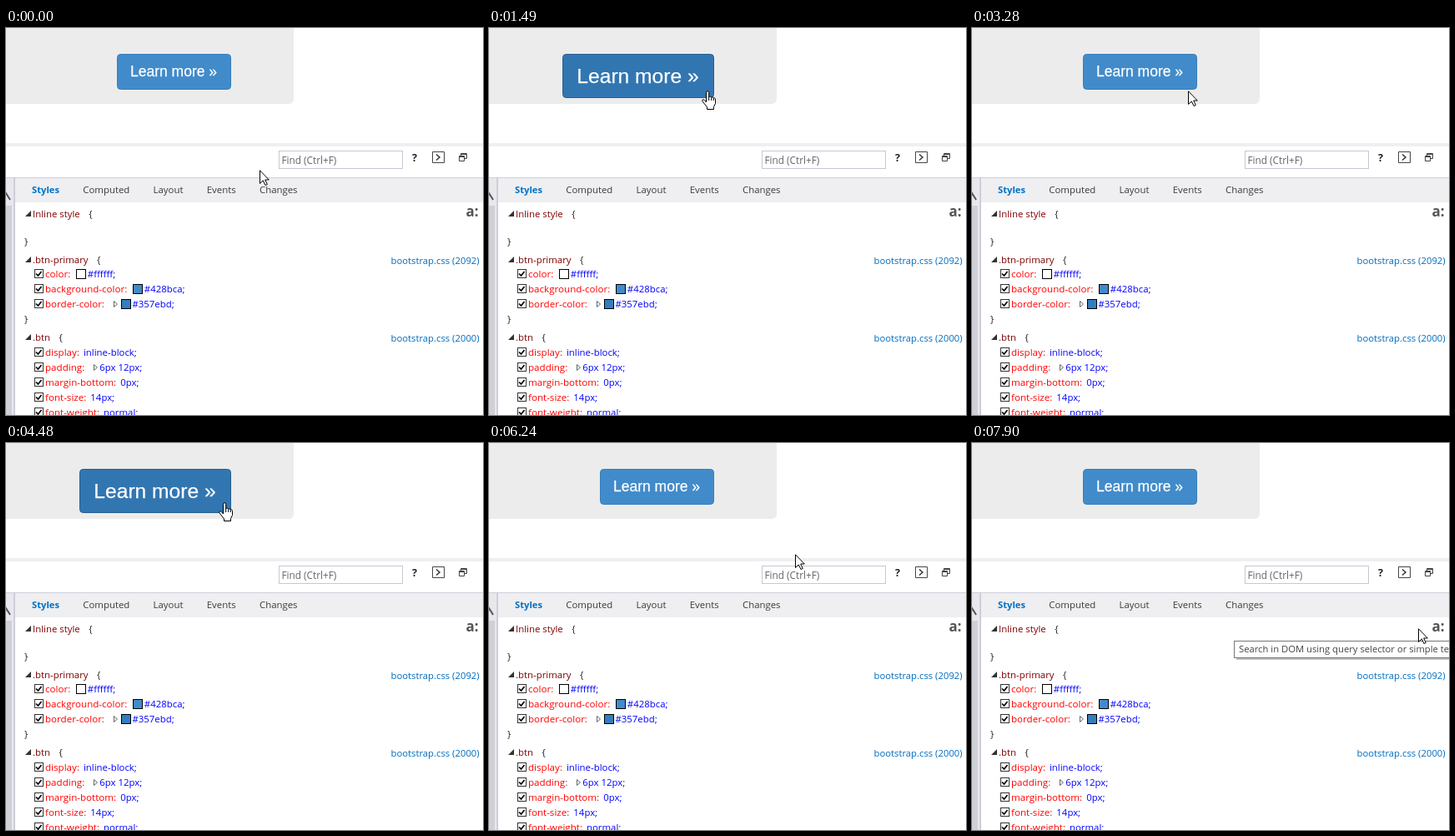
An HTML page for the animation above (8 s loop, 572 by 464 pixels).

```html
<!DOCTYPE html>
<html lang="en">
<head>
<meta charset="utf-8">
<title>Button hover with style inspector</title>
<style>
  html, body { margin: 0; width: 100%; height: 100%; overflow: hidden; background: #fff; }
  svg { display: block; width: 572px; height: 464px; }
  text { font: 11.4px "Open Sans", "Noto Sans", sans-serif; white-space: pre; }
  .button text { font-family: "Liberation Sans", Arial, sans-serif; fill: #fff; stroke: #fff; stroke-width: .25px; text-anchor: middle; }
  .tab { fill: #3c3c3c; }
  .tab.active { fill: #0072c6; font-weight: 700; font-size: 11.2px; }
  .selector { fill: #800000; }
  .brace { fill: #222; }
  .prop { fill: #f00; font-size: 11.6px; }
  .value { fill: #00f; }
  .link { fill: #006cbe; font-size: 11.3px; }
  .hint { fill: #666; font-size: 11.8px; }
  .tip { fill: #444; font-size: 11.25px; }
  .icon { font-weight: 700; }
</style>
</head>
<body>
<svg viewBox="0 0 572 464">
  <path fill="#ececec" d="M0 0H345V85a6 6 0 0 1-6 6H0Z"/>
  <g class="button" id="normal">
    <rect x="133.5" y="31.5" width="136" height="42" rx="4" fill="#428bca" stroke="#357ebd"/>
    <text x="201" y="58" style="font-size:17.5px">Learn more »</text>
  </g>
  <g class="button" id="hovered">
    <rect x="88.5" y="31.5" width="181" height="52" rx="4" fill="#3276b1" stroke="#285e8e"/>
    <text x="178.5" y="66" style="font-size:24.6px">Learn more »</text>
  </g>

  <path fill="#efeff2" d="M0 138H572V142H0ZM11 179H572V209H11Z"/>
  <path fill="#e8e8ec" d="M0 179H9V464H0Z"/>
  <path fill="#d0d1d7" d="M0 213H7V464H0Z"/>
  <path fill="#cccedb" d="M0 179H572V180H0ZM9 179H11V464H9Z"/>
  <path fill="none" stroke="#555" stroke-width="2" d="M-2 200L0 198 5 206"/>
  <rect id="field" x="327.5" y="147.5" width="148" height="21" fill="#fff"/>

  <text class="icon" x="487" y="160" style="font-size:12.5px" fill="#222">?</text>
  <path fill="none" stroke="#444" d="M511.5 148.5H525.5V161.5H511.5Z"/>
  <path fill="none" stroke="#333" stroke-width="1.5" d="M516 151.5L520 155 516 158.5"/>
  <path fill="none" stroke="#444" d="M545.5 153V150.5H552.5V156.5H550M543.5 153.5H549.5V159.5H543.5ZM543.5 154.5H549.5M545.5 151.5H552.5"/>
  <text class="icon" x="551.5" y="226" style="font-size:17px" fill="#555">a:</text>
  <g id="panel"></g>

  <g id="tooltip">
    <path fill="#000" opacity=".25" d="M317 257H572V260H317Z"/>
    <rect x="314.5" y="237.5" width="270" height="20" fill="#fff" stroke="#767676"/>
    <text class="tip" x="320" y="251">Search in DOM using query selector or simple text</text>
  </g>
  <g fill="#fff" stroke="#000">
    <path id="arrow" d="M.5 .8V16.5L4.3 12.9 7 18.5 9.3 17.5 6.7 12H11.3Z"/>
    <path id="hand" stroke-linejoin="round" d="M5.5 14V2.3a1.6 1.6 0 0 1 3.2 0V8a1.6 1.6 0 0 1 3 .4 1.5 1.5 0 0 1 2.6 .7 1.4 1.4 0 0 1 2.2 1.2V15.5L14.5 19.5V22.5H6.5V20L1 12.8c-1-1.5 .8-2.8 2-1.7ZM8.7 8V12M11.7 8.4V12M14.3 9.1V12"/>
  </g>
</svg>
<script>
const LOOP = 8000;
const FRAME = 125;
const LINE = 18;
const $ = id => document.getElementById(id);

function add(tag, attrs, content = '') {
  const el = document.createElementNS('http://www.w3.org/2000/svg', tag);
  for (const name in attrs) el.setAttribute(name, attrs[name]);
  el.textContent = content;
  $('panel').append(el);
  return el;
}

// Returns the right edge, so that the next item can follow it.
const label = (kind, x, y, content) =>
  x + add('text', { class: kind, x, y }, content).getComputedTextLength();
const box = (x, y, size, fill, stroke) =>
  add('rect', { x: Math.round(x) + .5, y: y + .5, width: size, height: size, fill, stroke });

function rule(name, y, link) {
  add('path', { d: `M30 ${y - 8}V${y - 1}H23Z`, fill: '#333' });
  const end = label('selector', 32, y, name);
  label('brace', end + 10.5, y, '{');
  if (link) label('link', 461.5, y + 1, link);
}

function declaration(y, [name, value, { expand, swatch } = {}]) {
  box(34, y - 10, 10, '#fff', '#333');
  add('path', { d: `M36 ${y - 4.5}l2.5 2.5 4-5`, fill: 'none', stroke: '#000', 'stroke-width': 1.7 });
  let x = label('prop', 47, y, name + ':') + 5;
  if (expand) {
    add('path', { d: `M${Math.round(x + 6) + .5} ${y - 7.5}l4 3.5-4 3.5Z`, fill: '#fff', stroke: '#666' });
    x += 13;
  }
  if (swatch) {
    box(x + 2, y - 10, 11, swatch, '#000');
    x += 15.5;
  }
  label('value', x, y, value + ';');
}

const block = (top, declarations) =>
  declarations.forEach((item, i) => declaration(top + i * LINE, item));

['Styles', 'Computed', 'Layout', 'Events', 'Changes'].reduce((x, name, i) =>
  label(i ? 'tab' : 'tab active', x, 198, name) + 28.3, 31);
label('hint', 330.5, 163, 'Find (Ctrl+F)');

rule('Inline style', 227);
label('brace', 22, 260, '}');

rule('.btn-primary', 282, 'bootstrap.css (2092)');
block(299, [
  ['color', '#ffffff', { swatch: '#fff' }],
  ['background-color', '#428bca', { swatch: '#428bca' }],
  ['border-color', '#357ebd', { swatch: '#357ebd', expand: true }]
]);
label('brace', 22, 353, '}');

rule('.btn', 375, 'bootstrap.css (2000)');
block(393, [
  ['display', 'inline-block'],
  ['padding', '6px 12px', { expand: true }],
  ['margin-bottom', '0px'],
  ['font-size', '14px'],
  ['font-weight', 'normal']
]);

// The pointer glides in even steps and rests between moves.
const origin = { x: 304, y: 170 };
const moves = [
  { from: 120, to: 120, x: 274, y: 134 },
  { from: 270, to: 520, x: 229, y: 67 },
  { from: 640, to: 780, x: 228, y: 60 },
  { from: 1490, to: 1620, x: 282, y: 89 },
  { from: 1760, to: 1760, x: 302, y: 93 },
  { from: 2760, to: 3010, x: 284, y: 89 },
  { from: 3160, to: 3280, x: 259, y: 75 },
  { from: 3400, to: 3520, x: 250, y: 65 },
  { from: 4480, to: 4600, x: 259, y: 77 },
  { from: 4750, to: 4890, x: 282, y: 89 },
  { from: 5730, to: 6090, x: 326, y: 109 },
  { from: 6240, to: 6240, x: 367, y: 133 },
  { from: 6360, to: 6950, x: 486, y: 220 },
  { from: 7100, to: 7900, x: 535, y: 222 }
];

function pointerAt(t) {
  const i = moves.findLastIndex(move => move.from <= t);
  if (i < 0) return origin;
  const { from, to, x, y } = moves[i];
  const start = moves[i - 1] || origin;
  const gaps = Math.round((to - from) / FRAME);
  const step = gaps ? Math.min(gaps, Math.floor((t - from) * gaps / (to - from))) : 0;
  const part = (step + 1) / (gaps + 1);
  return {
    x: Math.round(start.x + (x - start.x) * part),
    y: Math.round(start.y + (y - start.y) * part)
  };
}

const show = (id, on) => { $(id).style.display = on ? '' : 'none'; };

function draw(t) {
  const between = (from, to) => t >= from && t < to;
  const hover = between(520, 1620) || between(3400, 4750);
  const { x, y } = pointerAt(t);
  show('normal', !hover);
  show('hovered', hover);
  show('arrow', !hover);
  show('hand', hover);
  show('tooltip', t >= 7220);
  $(hover ? 'hand' : 'arrow').setAttribute('transform', `translate(${x} ${y})`);
  $('field').setAttribute('stroke', between(6520, 6670) ? '#9a9ba8' : '#c6c8d4');
}

const start = performance.now();
function tick() {
  draw((performance.now() - start) % LOOP);
  requestAnimationFrame(tick);
}
tick();
</script>
</body>
</html>
```
